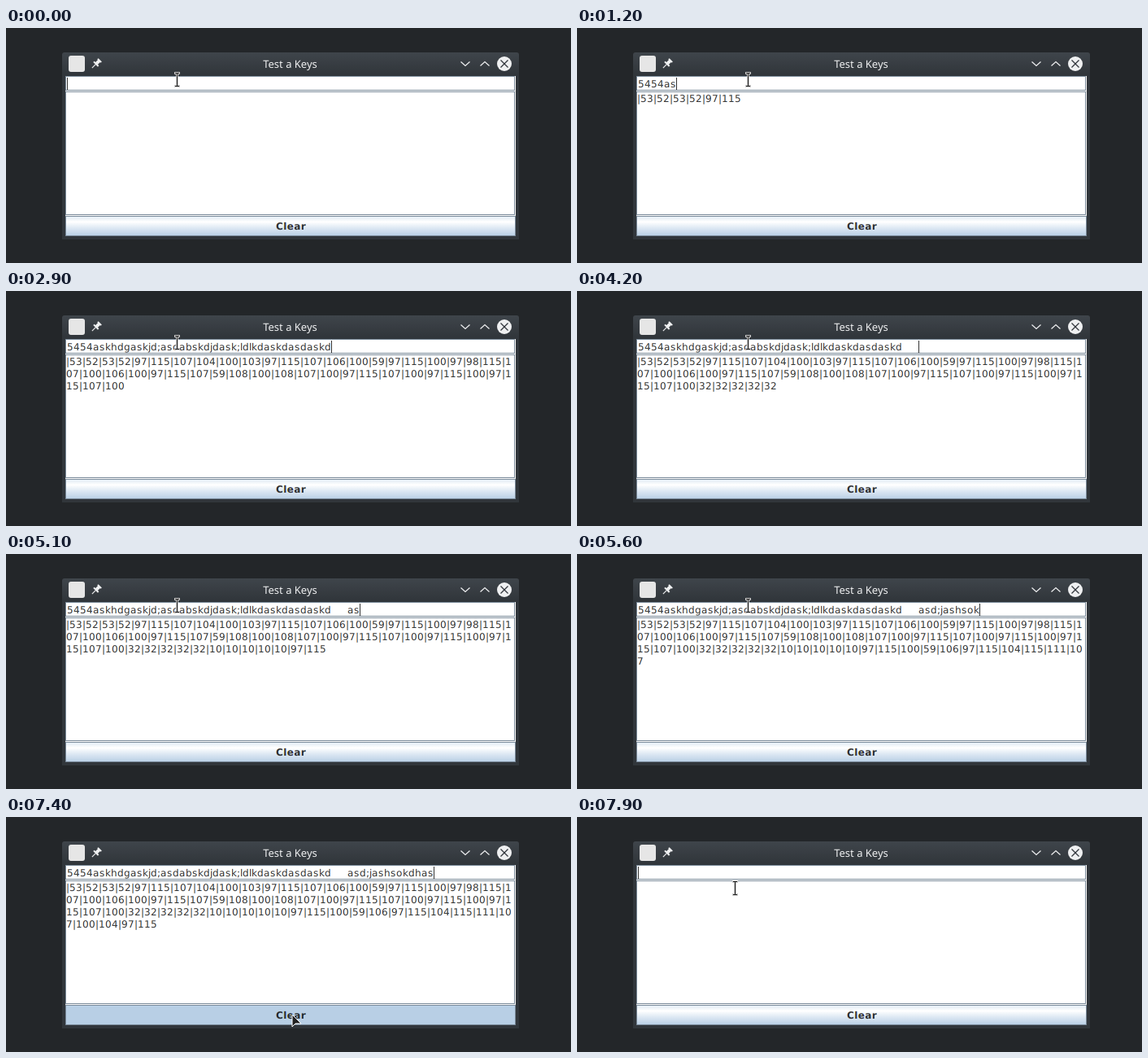
An HTML page with a canvas for the animation above (8000 ms loop, 695 px wide and 289 px high).

```html
<!DOCTYPE html>
<html>
<head>
<meta charset="utf-8">
<style>
html, body { margin: 0; width: 100%; height: 100%; overflow: hidden; background: #232629; }
canvas { display: block; }
</style>
</head>
<body>
<canvas width="695" height="289"></canvas>
<script>
const g = document.querySelector('canvas').getContext('2d', { alpha: false });
g.textRendering = 'geometricPrecision';

const LOOP = 8000, STEP = 100, PRESS = 7400, CLEAR = 7500;
const LINE = '#7a8a99', INK = '#333', LIGHT = '#eff0f1', FRAME = '#31363b', SKY = '#b8cfe5';
const FONT = '12px "DejaVu Sans", sans-serif';

// Each burst is typed evenly, its last key landing just before the end time
const BURSTS = [
  { start: 400, end: 800, text: '5454' },
  { start: 1100, end: 2900, text: 'askhdgaskjd;asdabskdjdask;ldlkdaskdasdaskd' },
  { start: 3200, end: 3300, text: ' ' },
  { start: 3600, end: 3700, text: ' ' },
  { start: 3900, end: 4200, text: '   ' },
  { start: 4500, end: 5000, text: '\n'.repeat(5) },
  { start: 5000, end: 5400, text: 'asd;jash' },
  { start: 5400, end: 5600, text: 'sok' },
  { start: 5600, end: 5700, text: 'dhas' },
];
const HOME = { x: 210, y: 63 };
const GLIDES = [
  { start: 6100, end: 6300, x: 262, y: 2 },
  { start: 6700, end: 7100, x: 362, y: 227 },
  { start: 7100, end: 7300, x: 352, y: 243 },
  { start: 7500, end: 7900, x: 194, y: 87 },
];

const progress = (t, { start, end }) => Math.max(0, Math.min(1, (t - start) / (end - start)));

function typed(t) {
  if (t >= CLEAR) return '';
  return BURSTS.map(b => b.text.slice(0, Math.floor(b.text.length * progress(t, b)))).join('');
}

function mouse(t) {
  return GLIDES.reduce((p, leg) => {
    const k = 1 - (1 - progress(t, leg)) ** 4;
    return { x: Math.round(p.x + (leg.x - p.x) * k), y: Math.round(p.y + (leg.y - p.y) * k) };
  }, HOME);
}

function rect(color, x, y, w, h) {
  g.fillStyle = color;
  g.fillRect(x, y, w, h);
}

function outline(color, x, y, w, h, width = 1) {
  g.strokeStyle = color;
  g.lineWidth = width;
  g.strokeRect(x + width / 2, y + width / 2, w - width, h - width);
}

function line(color, width, ...pts) {
  g.strokeStyle = color;
  g.lineWidth = width;
  g.beginPath();
  for (let i = 0; i < pts.length; i += 2) g.lineTo(pts[i], pts[i + 1]);
  g.stroke();
}

function gradient(y0, y1, ...stops) {
  const fill = g.createLinearGradient(0, y0, 0, y1);
  stops.forEach(([p, color]) => fill.addColorStop(p, color));
  return fill;
}

// Subpixel text: red, green and blue are a third of a pixel apart
function lcdText(text, x, y) {
  g.globalCompositeOperation = 'multiply';
  ['#3ff', '#f3f', '#ff3'].forEach((color, i) => {
    g.fillStyle = color;
    g.fillText(text, x + (1 - i) / 3, y);
  });
  g.globalCompositeOperation = 'source-over';
}

// Whole-pixel advances of the hinted font
const WIDE = { a: 8, o: 8, s: 7 };
const advance = ch => WIDE[ch] || Math.round(g.measureText(ch).width);

// Draws text glyph by glyph, wrapping at limit; returns the end x
function type(text, left, base, limit = Infinity) {
  let x = left;
  g.font = FONT;
  g.textAlign = 'left';
  for (const ch of text) {
    const w = advance(ch);
    if (x + w - left > limit) { x = left; base += 15; }
    lcdText(ch, x, base);
    x += w;
  }
  return x;
}

function titleBar() {
  g.fillStyle = gradient(30, 59, [0, '#3f454b'], [.9, FRAME]);
  g.beginPath();
  g.roundRect(69, 30, 562, 230, [3, 3, 0, 0]);
  g.fill();

  g.fillStyle = '#e6e6e6';
  g.beginPath();
  g.roundRect(77, 34, 20, 20, 3);
  g.fill();

  g.save();
  g.translate(111.5, 43.5);
  g.rotate(Math.PI / 4);
  rect(LIGHT, -3, -6, 6, 2);
  rect(LIGHT, -2, -5, 4, 6);
  rect(LIGHT, -4, 0, 8, 2);
  rect(LIGHT, -.6, 2, 1.2, 6);
  g.restore();

  g.font = '13px "Noto Sans", sans-serif';
  g.fillStyle = LIGHT;
  g.textAlign = 'center';
  g.fillText('Test a Keys', 349.5, 49);

  line(LIGHT, 1.2, 559.5, 41.5, 565, 46.5, 570.5, 41.5);
  line(LIGHT, 1.2, 583.5, 46.5, 589, 41.5, 594.5, 46.5);
  g.fillStyle = LIGHT;
  g.beginPath();
  g.arc(613, 44, 9, 0, 7);
  g.fill();
  line(FRAME, 1.2, 608.5, 39.5, 617.5, 48.5);
  line(FRAME, 1.2, 617.5, 39.5, 608.5, 48.5);
}

function sunken(x, y, w, h) {
  rect('#eee', x, y, w, h);
  rect('#fff', x + 1, y + 1, w - 1, h - 1);
  outline(LINE, x, y, w - 1, h - 1);
}

function button(hover, pressed) {
  rect(pressed ? SKY : gradient(231, 256, [0, '#dde8f3'], [.3, '#fff'], [.6, '#dde8f3'], [1, SKY]),
    73, 231, 554, 25);
  outline(LINE, 73, 231, 554, 25);
  if (hover && !pressed) outline(SKY, 74, 232, 552, 23, 2);
  g.font = 'bold ' + FONT;
  g.textAlign = 'center';
  g.letterSpacing = '.4px';
  lcdText('Clear', 350.5, 248);
  g.letterSpacing = '0px';
}

function textCursor(x, y) {
  for (const [color, d] of [['#ccc', 1], ['#222', 0]]) {
    const bar = 1 + 2 * d;
    rect(color, x - 2 - d, y - 8 - d, 5 + 2 * d, bar);
    rect(color, x - 2 - d, y + 8 - d, 5 + 2 * d, bar);
    rect(color, x - d, y - 8, bar, 17);
  }
}

function arrow(x, y) {
  g.beginPath();
  [[0, 0], [0, 15], [4, 11], [11, 11]].forEach(([dx, dy]) => g.lineTo(x + dx, y + dy));
  g.closePath();
  g.fillStyle = '#222';
  g.fill();
  g.strokeStyle = '#fff';
  g.lineWidth = 1;
  g.stroke();
}

function draw(now) {
  const t = Math.floor(now % LOOP / STEP) * STEP;
  const keys = typed(t);
  const { x, y } = mouse(t);

  rect('#232629', 0, 0, 695, 289);
  titleBar();
  sunken(73, 59, 554, 19);
  sunken(73, 78, 554, 153);
  button(y > 231, t === PRESS);

  const end = type(keys.replace(/\n/g, ''), 75, 73);
  const codes = [...keys].map(k => '|' + k.charCodeAt(0)).join('');
  type(codes, 74, 91, 551);

  const blinkOff = t >= 300 && t < 500 || t >= 6200 && t < 6800;
  if (!blinkOff) rect(INK, end, 61, 1, 15);

  (y < 59 || y > 231 ? arrow : textCursor)(x, y);
  requestAnimationFrame(draw);
}
requestAnimationFrame(draw);
</script>
</body>
</html>
```
